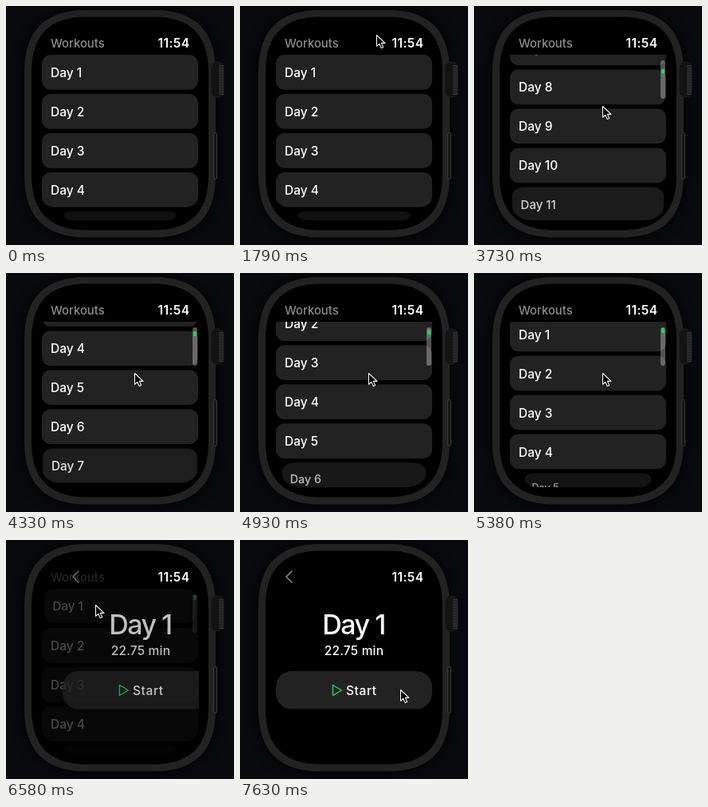
Animation of 286x299 px, one loop 8 s. Source, as an HTML page with a canvas:

```html
<!DOCTYPE html>
<html>
<head>
<meta charset="utf-8">
<style>
  html, body { margin: 0; width: 100%; height: 100%; overflow: hidden; background: #090a0e; }
  canvas { display: block; width: 286px; height: 299px; }
</style>
</head>
<body>
<canvas id="stage"></canvas>
<script>
const LOOP = 8000, TICK = 150, MOVE = 300;
const ROW = '#222223', GREY = '#8b8b8d', GREEN = '#1fd865';
const canvas = document.getElementById('stage');
const ctx = canvas.getContext('2d');
const dpr = window.devicePixelRatio || 1;
canvas.width = 286 * dpr;
canvas.height = 299 * dpr;

const clamp = (v, lo, hi) => Math.max(lo, Math.min(hi, v));

// Smooth 0..1 progress between two times
function ease(t, from, to) {
  const u = clamp((t - from) / (to - from), 0, 1);
  return u * u * (3 - 2 * u);
}

// One fling down the list, then two back up to the top
const scrollAt = t =>
  345 * ease(t, 2420, 3290) - 239 * ease(t, 3550, 4550) - 106 * ease(t, 4530, 5530);

// The pointer starts each move at the given time
const cursorStops = [
  { at: 900, x: 171, y: 90 },
  { at: 1400, x: 171, y: 36 },
  { at: 2980, x: 161, y: 125 },
  { at: 5980, x: 112, y: 81 },
  { at: 6880, x: 248, y: 163 },
  { at: 7330, x: 201, y: 187 },
];

function cursorAt(t) {
  return cursorStops.reduce((pos, stop) => {
    const k = ease(t, stop.at, stop.at + MOVE);
    return { x: pos.x + (stop.x - pos.x) * k, y: pos.y + (stop.y - pos.y) * k };
  }, { x: 147, y: 215 });
}

function paint(fill, stroke, width = 1) {
  if (fill) { ctx.fillStyle = fill; ctx.fill(); }
  if (stroke) { ctx.strokeStyle = stroke; ctx.lineWidth = width; ctx.stroke(); }
}

function box(x, y, w, h, r, fill, stroke) {
  ctx.beginPath();
  ctx.roundRect(x, y, w, h, r);
  paint(fill, stroke);
}

// Rounded box whose corners ease gradually into the sides
function squircle(x, y, w, h, r, fill) {
  const c = r * .33;
  ctx.save();
  ctx.translate(x + w / 2, y + h / 2);
  ctx.beginPath();
  for (let i = 0; i < 4; i++) {
    const a = (i % 2 ? h : w) / 2, b = (i % 2 ? w : h) / 2;
    ctx.lineTo(a - r, -b);
    ctx.bezierCurveTo(a - c, -b, a, c - b, a, r - b);
    ctx.rotate(Math.PI / 2);
  }
  ctx.closePath();
  paint(fill);
  ctx.restore();
}

function polyline(points, fill, stroke, width, closed) {
  ctx.beginPath();
  points.forEach(([x, y]) => ctx.lineTo(x, y));
  if (closed) ctx.closePath();
  ctx.lineJoin = ctx.lineCap = 'round';
  paint(fill, stroke, width);
}

function label(str, x, baseline, { size = 15.5, color = '#fff', weight = 500, align = 'left', spacing = 0 } = {}) {
  ctx.font = `${weight} ${size}px Inter, sans-serif`;
  ctx.letterSpacing = spacing + 'px';
  ctx.textAlign = align;
  ctx.fillStyle = color;
  ctx.fillText(str, x, baseline);
}

function drawWatch() {
  ctx.fillStyle = '#090a0e';
  ctx.fillRect(0, 0, 286, 299);
  ctx.shadowColor = '#000';
  ctx.shadowBlur = 16 * dpr;
  squircle(23, 5, 240, 284.5, 78, '#222');
  ctx.shadowBlur = 0;
  squircle(32, 13.5, 222, 267, 69, '#000');
  box(257.5, 70, 15.5, 44, 7, '#131313', '#1c1c1c');
  ctx.fillStyle = '#3a3a3a';
  for (let y = 74; y < 111; y += 2) ctx.fillRect(267, y, 6, 1);
  box(260.5, 158.5, 4, 58, 2, '#161616', '#3a3a3a');
}

// Rows near the bottom shrink along the curve of the screen
function drawRow(day, top, pressed) {
  const depth = clamp(top - 208, 0, 53);
  const inset = 48 * (1 - Math.sqrt(1 - (depth / 54) ** 2));
  const scale = (1 - inset / 98) * (pressed ? .97 : 1);
  const half = 98 * scale;
  const bottom = Math.min(top + 43.7 * scale, 268);
  const curve = clamp((bottom - 243) / 25, 0, 1);
  const upper = { x: 11 + depth * .2, y: 11 };
  const lower = { x: 11 + 14 * curve, y: 11 + 6 * curve };
  ctx.save();
  ctx.globalAlpha *= 1 - depth / 100;
  box(143 - half, top, half * 2, bottom - top, [upper, upper, lower, lower], ROW);
  ctx.clip();
  label('Day ' + day, 143 - 87 * scale, top + 28 * scale, { size: 15.5 * scale });
  ctx.restore();
}

function drawList(scroll, showBar, pressed) {
  label('Workouts', 56, 52, { size: 14.8, color: GREY });
  ctx.save();
  ctx.beginPath();
  ctx.rect(44, 61, 198, 207);
  ctx.clip();
  for (let day = 1; day <= 14; day++) {
    const top = 61 + 49 * (day - 1) - scroll;
    if (top > 15 && top < 262) drawRow(day, top, pressed && day === 1);
  }
  if (showBar) {
    box(234, 68, 6, 48, 3, 'rgba(255, 255, 255, .32)');
    box(235, 68.5 + scroll * .031, 4, 6.5, 2, GREEN);
  }
  ctx.restore();
}

function drawDetail() {
  polyline([[65, 39], [58, 46], [65, 53]], null, GREY, 1.6);
  label('Day 1', 142.5, 118, { size: 34, align: 'center', spacing: -1.5 });
  label('22.75 min', 143, 144, { align: 'center', spacing: .2 });
  box(45, 164, 196, 47.5, 20, ROW);
  polyline([[116.5, 181.5], [127.5, 188], [116.5, 194.5]], null, GREEN, 1.4, true);
  label('Start', 133, 193.5, { spacing: .6 });
}

function drawCursor({ x, y }) {
  ctx.save();
  ctx.translate(x + .5, y + .5);
  ctx.scale(.95, .95);
  polyline([[0, 0], [0, 14.5], [3.4, 11.4], [6, 17], [8.6, 15.8], [6.1, 10.4], [11, 10.4]],
    '#000', '#fff', 1.1, true);
  ctx.restore();
}

function render(now) {
  const t = now % LOOP;
  const start = t < 1780 ? 0 : 1780;
  const tick = start + Math.floor((t - start) / TICK) * TICK;
  const push = ease(tick, 6280, 6730);

  ctx.setTransform(dpr, 0, 0, dpr, 0, 0);
  drawWatch();
  label('11:54', 230.4, 52, { weight: 600, align: 'right', spacing: .4 });
  if (push < 1) {
    ctx.globalAlpha = 1 - push;
    drawList(scrollAt(tick), tick >= 2530, tick >= 6280);
  }
  if (push > 0) {
    ctx.save();
    ctx.globalAlpha = push;
    ctx.beginPath();
    ctx.rect(44, 36, 198, 232);
    ctx.clip();
    ctx.translate((1 - push) * 100, 0);
    drawDetail();
    ctx.restore();
  }
  ctx.globalAlpha = 1;
  if (tick >= 900) drawCursor(cursorAt(tick));
  requestAnimationFrame(() => render(performance.now()));
}
render(0);
</script>
</body>
</html>
```
